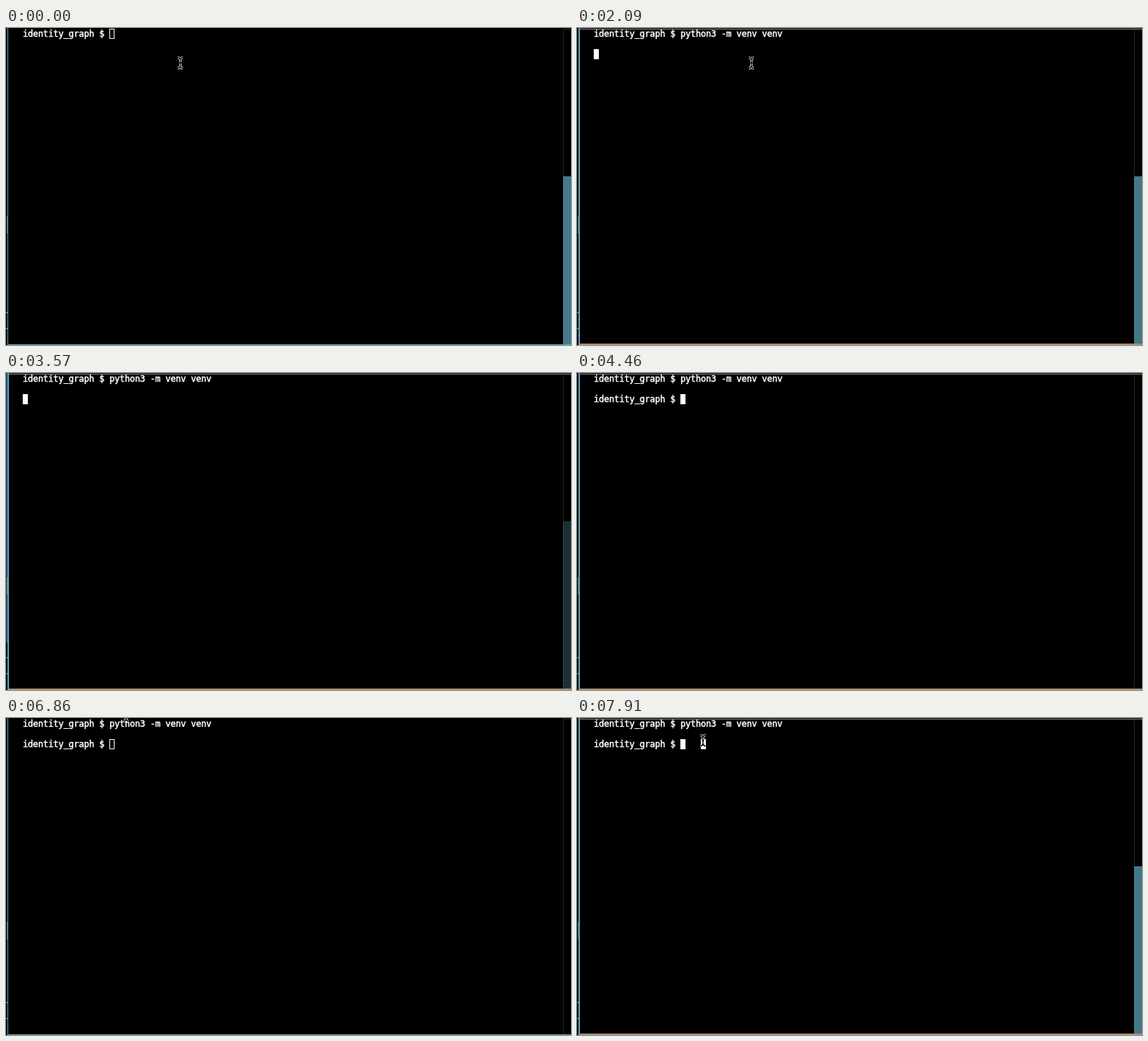
Recreate the animation shown at these times as an HTML page with a canvas. Size 776 px wide and 436 px high, loop 8000 ms.

```html
<!DOCTYPE html>
<html lang="en">
<head>
<meta charset="utf-8">
<title>Terminal session</title>
<style>
  html, body { margin: 0; width: 100%; height: 100%; overflow: hidden; background: #000; }
  canvas { display: block; }
</style>
</head>
<body>
<canvas id="stage" width="776" height="436"></canvas>
<script>
const ctx = document.getElementById('stage').getContext('2d');
const LOOP = 8000;
const STEP = 145;
const CELL = { w: 7, h: 14, left: 23, top: 1 };
const PROMPT = 'identity_graph $ ';
const COMMAND = 'python3 -m venv venv';
const BLUE = '#55a5cc';

// Rises from 0 to 1 in equal steps; the first step lands at the start time.
function ramp(t, start, steps) {
  const taken = Math.floor((t - start) / STEP) + 1;
  return Math.min(Math.max(taken / steps, 0), 1);
}

function rect(color, x, y, w, h) {
  ctx.fillStyle = color;
  ctx.fillRect(x, y, w, h);
}

const cellX = col => CELL.left + col * CELL.w;
const cellY = row => CELL.top + row * CELL.h;

function print(text, col, row, color = '#fff') {
  ctx.font = '12px "DejaVu Sans Mono", monospace';
  ctx.fillStyle = ctx.strokeStyle = color;
  ctx.lineWidth = 0.45;
  [...text].forEach((char, i) => {
    const at = [char, cellX(col + i), cellY(row) + 11];
    ctx.fillText(...at);
    ctx.strokeText(...at);
  });
}

function fillCells(col, row, count = 1) {
  rect('#fff', cellX(col), cellY(row), count * CELL.w, CELL.h);
}

function drawCaret(col, row, active) {
  if (active) return fillCells(col, row);
  ctx.strokeStyle = '#fff';
  ctx.lineWidth = 1;
  ctx.strokeRect(cellX(col) + 0.5, cellY(row) + 0.5, CELL.w - 1, CELL.h - 1);
}

function drawTerminal(t, active) {
  const pasted = t >= 1200 && t < 2090;
  const end = PROMPT.length;

  print(PROMPT, 0, 0);
  if (pasted) fillCells(end, 0, COMMAND.length);
  if (t >= 1200) print(COMMAND, end, 0, pasted ? '#000' : '#fff');
  if (t >= 4460) print(PROMPT, 0, 2);

  if (t < 1200) drawCaret(end, 0, active);
  else if (pasted) drawCaret(0, 1, active);
  else drawCaret(t < 4460 ? 0 : end, 2, active);

  if (t >= 7310) fillCells(21, 2);
}

function drawPanels(t) {
  rect('#252525', 765, 1, 1, 434);
  ctx.globalAlpha = 1 - ramp(t, 3280, 5) + ramp(t, 7010, 3);
  rect('#45788b', 765, 204, 11, 231);
  ctx.globalAlpha = ramp(t, 2840, 2) - ramp(t, 3420, 5);
  rect('#3f7f98', 0, 0, 2, 371);
  ctx.globalAlpha = 1;

  const handleTop = t < 2840 ? 259 : 281;
  for (let y = 0; y < 23; y += 2) rect('#c9a888', 1, handleTop + y, 1, 1);
  for (const y of [391, 413]) rect('#aaa', 0, y, 2, 1);
}

function drawFrame(active) {
  rect(BLUE, 2, 0, active ? 2 : 1, 436);
  rect(BLUE, 2, 435, 774, 1);
  if (active) {
    rect('#888', 3, 1, 773, 1);
    rect('#f07c28', 3, 434, 773, 1);
  } else {
    rect('#252525', 765, 1, 11, 1);
  }
}

function pointerPosition(t) {
  if (t < 6860) {
    const leave = ramp(t, 3130, 2);
    return [239.5 - 12 * leave, 48 - 84 * leave];
  }
  const enter = ramp(t, 6860, 3);
  return [161 + 12 * enter, -20 + 51 * enter];
}

function drawPointer(x, y) {
  ctx.save();
  ctx.translate(x, y);
  ctx.beginPath();
  for (const side of [-1, 1]) {
    ctx.moveTo(-3.5, side * 7.5);
    ctx.quadraticCurveTo(-0.8, side * 7.2, 0, side * 4.5);
    ctx.quadraticCurveTo(0.8, side * 7.2, 3.5, side * 7.5);
  }
  ctx.moveTo(0, -5);
  ctx.lineTo(0, 5);
  ctx.moveTo(-1.5, 0);
  ctx.lineTo(1.5, 0);
  for (const [color, width] of [['#fff', 3.2], ['#000', 1.4]]) {
    ctx.strokeStyle = color;
    ctx.lineWidth = width;
    ctx.stroke();
  }
  ctx.restore();
}

function draw(t) {
  const active = (t >= 450 && t < 5510) || t >= 7310;
  rect('#000', 0, 0, 776, 436);
  drawTerminal(t, active);
  drawPanels(t);
  drawFrame(active);
  drawPointer(...pointerPosition(t));
}

const start = performance.now();
function tick() {
  draw((performance.now() - start) % LOOP);
  requestAnimationFrame(tick);
}
tick();
</script>
</body>
</html>
```
